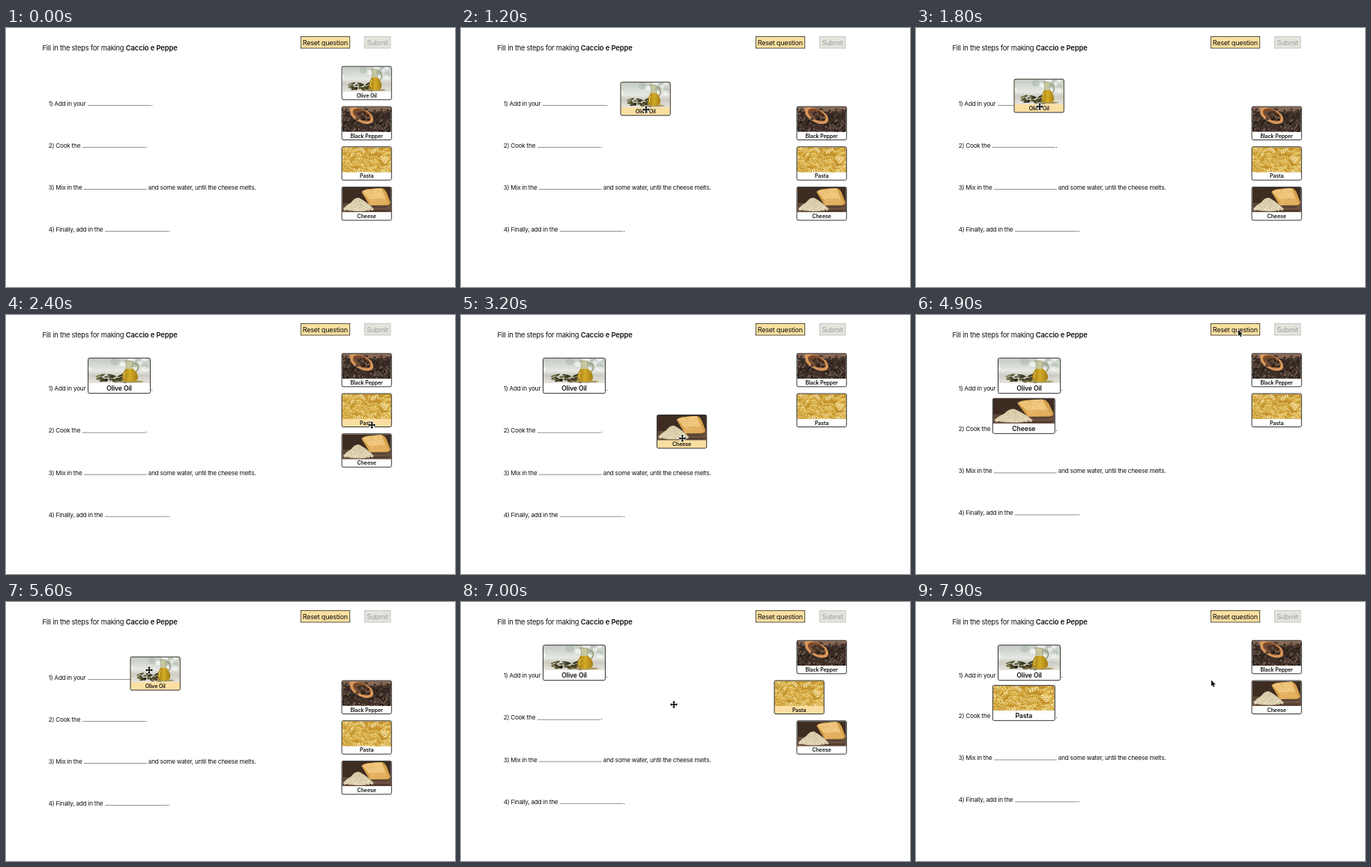
Write an HTML page that moves like this. It is 599x346 px and loops after 8000 ms.

```html
<!DOCTYPE html>
<html lang="en">
<head>
<meta charset="utf-8">
<title>Recipe steps</title>
<style>
  html, body { margin: 0; width: 100%; height: 100%; overflow: hidden; background: #fff; }
  svg.stage { display: block; width: 599px; height: 346px; }
  text { font: 8.2px Inter, sans-serif; letter-spacing: -.03em; fill: #111; }
  .title { font-size: 9.35px; letter-spacing: -.026em; }
  .button { font-size: 9.1px; text-anchor: middle; }
  .label { font-weight: 600; font-size: 7px; text-anchor: middle; letter-spacing: -.015em; }
  .label.big { font-size: 8.7px; }
  tspan { font-weight: 600; letter-spacing: -.01em; }
</style>
</head>
<body>
<svg class="stage" viewBox="0 0 599 346">
  <defs>
    <linearGradient id="light" x2="0" y2="1">
      <stop offset="0" stop-color="#c3cbc3"/><stop offset=".5" stop-color="#e6e8e3"/>
      <stop offset=".68" stop-color="#cdcbc3"/><stop offset="1" stop-color="#e6e3dc"/>
    </linearGradient>
    <linearGradient id="oil" x2="1">
      <stop offset="0" stop-color="#977411"/><stop offset=".5" stop-color="#d4ab25"/><stop offset="1" stop-color="#a27d16"/>
    </linearGradient>
    <symbol id="olive" viewBox="0 0 66 33" preserveAspectRatio="none"></symbol>
    <symbol id="pepper" viewBox="0 0 66 33" preserveAspectRatio="none"></symbol>
    <symbol id="pasta" viewBox="0 0 66 33" preserveAspectRatio="none"></symbol>
    <symbol id="cheese" viewBox="0 0 66 33" preserveAspectRatio="none"></symbol>
  </defs>
  <text class="title" x="48.5" y="30.3">Fill in the steps for making <tspan>Caccio e Peppe</tspan></text>
  <rect x="393.3" y="11.4" width="65.4" height="15.6" fill="#f9dfa0" stroke="#332f25" stroke-width=".8"/>
  <text class="button" x="425.8" y="22.5">Reset question</text>
  <rect x="478.4" y="11.4" width="34.6" height="15.6" fill="#e4e4df" stroke="#bcbcb8" stroke-width=".8"/>
  <text class="button" x="495.6" y="22.5" style="fill:#a0a09c">Submit</text>
  <g id="scene"></g>
</svg>
<script>
const LOOP = 8000, STEP = 100, RESET = 5000, SHOW = 300;
const LIST_X = 447.5, LIST_Y = 50.8, PITCH = 53.7;

const names = { olive: 'Olive Oil', pepper: 'Black Pepper', pasta: 'Pasta', cheese: 'Cheese' };
const rows = [
  { text: '1) Add in your', x: 109, after: '.' },
  { text: '2) Cook the', x: 101.8, after: '.' },
  { text: '3) Mix in the', x: 103.8, after: 'and some water, until the cheese melts.', gap: 1.6 },
  { text: '4) Finally, add in the', x: 132, after: '.' },
];
const drags = [
  { id: 'olive', row: 0, grab: 1000, drop: 1900, lag: 0 },
  { id: 'cheese', row: 1, grab: 2900, drop: 3700, lag: 0 },
  { id: 'olive', row: 0, grab: 5400, drop: 5900, lag: 0 },
  { id: 'pasta', row: 1, grab: 6800, drop: 7300, lag: 100 },
];
// Pointer path: time, x, y
const path = [
  [300, 496, 118], [700, 482, 88], [1000, 482, 88], [1200, 247, 109], [1400, 165, 105], [1900, 165, 105],
  [2300, 486, 145], [2400, 488, 147], [2700, 482, 190], [2900, 482, 190], [3400, 171, 148], [4500, 171, 148],
  [4900, 430, 20], [5000, 430, 20], [5300, 473, 69], [5400, 473, 69], [5600, 191, 91], [5800, 160, 100],
  [6000, 160, 100], [6500, 484, 130], [6800, 484, 130], [6900, 454, 130], [7000, 284, 137],
  [7100, 131, 138], [7400, 131, 138], [7800, 394, 104.5],
];

function pointer(t) {
  const i = path.findIndex(p => p[0] > t);
  if (i < 0) return path.at(-1).slice(1);
  if (!i) return path[0].slice(1);
  const [t0, x0, y0] = path[i - 1], [t1, x1, y1] = path[i];
  const k = (t - t0) / (t1 - t0);
  return [x0 + (x1 - x0) * k, y0 + (y1 - y0) * k];
}

let seed = 7;
const rnd = (a, b) => {
  seed = seed * 16807 % 2147483647;
  return a + (b - a) * seed / 2147483647;
};
const pick = list => list[Math.floor(rnd(0, list.length))];
const many = (n, make) => Array.from({ length: n }, make).join('');
const box = (fill, y = 0) => `<rect y="${y}" width="66" height="33" fill="${fill}"/>`;
const shape = (d, fill, extra = '') => `<path d="${d}" fill="${fill}" ${extra}/>`;
const line = (d, color, width) => shape(d, 'none', `stroke="${color}" stroke-width="${width}"`);
const dot = (x, y, r, fill) => `<circle cx="${x}" cy="${y}" r="${r}" fill="${fill}"/>`;

const corns = ['#211a17', '#352822', '#54433a', '#6d594c', '#43332b'];
const photos = {
  olive: () => box('url(#light)')
    + many(14, () => dot(rnd(0, 66), rnd(0, 15), rnd(2, 5), pick(['#ffffff99', '#9fae9f66'])))
    + many(26, () => {
      const x = rnd(7, 38), y = rnd(22, 31);
      return `<ellipse cx="${x}" cy="${y}" rx="${rnd(2, 4.5)}" ry="1" transform="rotate(${rnd(-40, 35)} ${x} ${y})" fill="${pick(['#4c5130', '#77754a', '#35371f'])}"/>`;
    })
    + many(8, () => dot(rnd(14, 36), rnd(26, 30), 1.9, pick(['#2b271a', '#494326'])))
    + '<ellipse cx="46" cy="30.8" rx="13" ry="1.5" fill="#a8965c"/>'
    + line('M49 6Q57 10 51 18', '#8f8b68', 1.2)
    + shape('M39 3L48 4Q46 9 48 15L40 15Q42 8 39 3Z', '#c8c89f', 'stroke="#8f8d66" stroke-width=".6"')
    + shape('M40 14H48Q54 20 53 27Q52 31 45 31Q37 31 36 27Q36 20 40 14Z', 'url(#oil)')
    + line('M40 18Q37 22 39 27', '#ecd26a', 1),

  pepper: () => box('#3a2c25') + box('#8a6a55', -27)
    + many(230, () => dot(rnd(0, 66), rnd(3, 33), rnd(1, 1.7), pick(corns)))
    + many(60, () => dot(rnd(0, 66), rnd(5, 33), .5, '#8b776a'))
    + shape('M10 1Q20-1 33 5Q43 11 42 18Q40 24 29 22Q15 18 11 9Z', '#d8975b')
    + '<ellipse cx="26.5" cy="10.5" rx="13" ry="7" transform="rotate(27 26.5 10.5)" fill="#7c4a2b"/>'
    + many(32, () => dot(27 + rnd(-8, 9), 12 + rnd(-5, 5), 1.5, pick(corns))),

  pasta: () => box('#c4932e')
    + many(95, () => {
      const turn = `translate(${rnd(-2, 68)} ${rnd(-1, 34)}) rotate(${rnd(-65, 65)})`;
      return `<g transform="${turn}"><rect x="-5.5" y="-2" width="11" height="4" rx="1.7" fill="${pick(['#efcf6d', '#e2b94d', '#f6e09a', '#d9ad41'])}"/>`
        + line('M-4 2L-2-2M-1 2L1-2M2 2L4-2', '#b1842a', .8) + line('M-5-1.2H5', '#fbebb5', .5) + '</g>';
    }),

  cheese: () => box('#3d2c22') + box('#6b5140', 21)
    + many(9, () => `<rect x="${rnd(-5, 40)}" y="${rnd(21, 32)}" width="30" height=".7" fill="#463429"/>`)
    + shape('M26 6Q30 2 37 2L53 1Q57 1 60 7L65 20Q64 24 59 24L37 24Z', '#d6a04a')
    + shape('M27 5Q40 1 53 1L59 15L36 16Z', '#eec47a')
    + shape('M36 16L59 15L63 22L38 24Z', '#e3b062')
    + many(14, () => line(`M${rnd(32, 54)} ${rnd(4, 20)}l${rnd(1, 4)} ${rnd(-1, 1)}`, pick(['#f7d79a', '#cf9a47']), .7))
    + shape('M1 29Q6 23 12 20Q19 11 25 15Q34 20 43 29Q22 35 1 29Z', '#d8ccaa')
    + many(150, () => {
      const x = rnd(2, 41), y = 31 - rnd(0, 15) * (1 - Math.abs(x - 21) / 22);
      return line(`M${x} ${y}l${rnd(-2, 2)} ${rnd(-1, 1)}`, pick(['#fbf5df', '#f0e7cc', '#bcae8a']), .8);
    }),
};
for (const id in photos) document.getElementById(id).innerHTML = photos[id]();

function card({ id, x, y, big }, active) {
  const w = big ? 84 : 67.3, h = big ? 48 : 45.5, photo = big ? 34 : 34.2;
  return `<g transform="translate(${x} ${y})">
    <rect x=".5" y=".5" width="${w - 1}" height="${h - 1}" rx="2" fill="${active ? '#fbdfa2' : '#fff'}"/>
    <use href="#${id}" x="1" y="1" width="${w - 2}" height="${photo - 1}"/>
    <rect x=".5" y=".5" width="${w - 1}" height="${h - 1}" rx="2" fill="none" stroke="#1c1c1c" stroke-width=".9"/>
    <text class="label ${big ? 'big' : ''}" x="${w / 2}" y="${big ? 44.2 : 42}">${names[id]}</text></g>`;
}

function cursor(x, y, move) {
  const d = move
    ? 'M0-5L2-2.8H.7V-.7H2.8V-2L5 0L2.8 2V.7H.7V2.8H2L0 5L-2 2.8H-.7V.7H-2.8V2L-5 0L-2.8-2V-.7H-.7V-2.8H-2Z'
    : 'M0 0V8L1.8 6.3L3.1 9.2L4.4 8.6L3.1 5.8H5.6Z';
  return `<path transform="translate(${x} ${y})" d="${d}" stroke="#fff" stroke-width="1.3" paint-order="stroke"/>`;
}

function draw(t) {
  const placed = drags.filter(d => d.drop <= t && (t < RESET || d.grab > RESET));
  const held = drags.find(d => d.grab <= t && t < d.drop);
  const [px, py] = pointer(t);
  const cards = [];
  let out = '', lift = 0;

  rows.forEach((row, i) => {
    const item = placed.find(d => d.row === i);
    if (item) lift += 2.3;
    const y = 103.7 + 56.05 * i - lift;
    const end = row.x + 84.4 + (row.gap || 0);
    out += `<text x="56.7" y="${y}">${row.text}</text><text x="${end}" y="${y}">${row.after}</text>`;
    if (item) cards.push({ id: item.id, x: row.x, y: y - 44.3, big: true });
    else out += `<path d="M${row.x} ${y - .3}h84" stroke="#444" stroke-width=".6"/>`;
  });

  Object.keys(names).filter(id => !placed.some(d => d.id === id)).forEach((id, i) => {
    const item = { id, x: LIST_X, y: LIST_Y + PITCH * i };
    if (held?.id === id) {
      const [gx, gy] = pointer(held.grab), [cx, cy] = pointer(Math.max(held.grab, t - held.lag));
      item.x += cx - gx;
      item.y += cy - gy;
    }
    cards.push(item);
  });

  const over = c => px > c.x && px < c.x + (c.big ? 84 : 67) && py > c.y && py < c.y + (c.big ? 48 : 45);
  const active = t < SHOW ? null : cards.find(c => held ? c.id === held.id : over(c));
  for (const c of cards) if (c !== active) out += card(c, false);
  if (active) out += card(active, true);
  if (t >= SHOW) out += cursor(px, py, active);
  document.getElementById('scene').innerHTML = out;
}

let last = -1;
function frame() {
  const t = Math.floor(performance.now() % LOOP / STEP) * STEP;
  if (t !== last) draw(last = t);
  requestAnimationFrame(frame);
}
frame();
</script>
</body>
</html>
```
